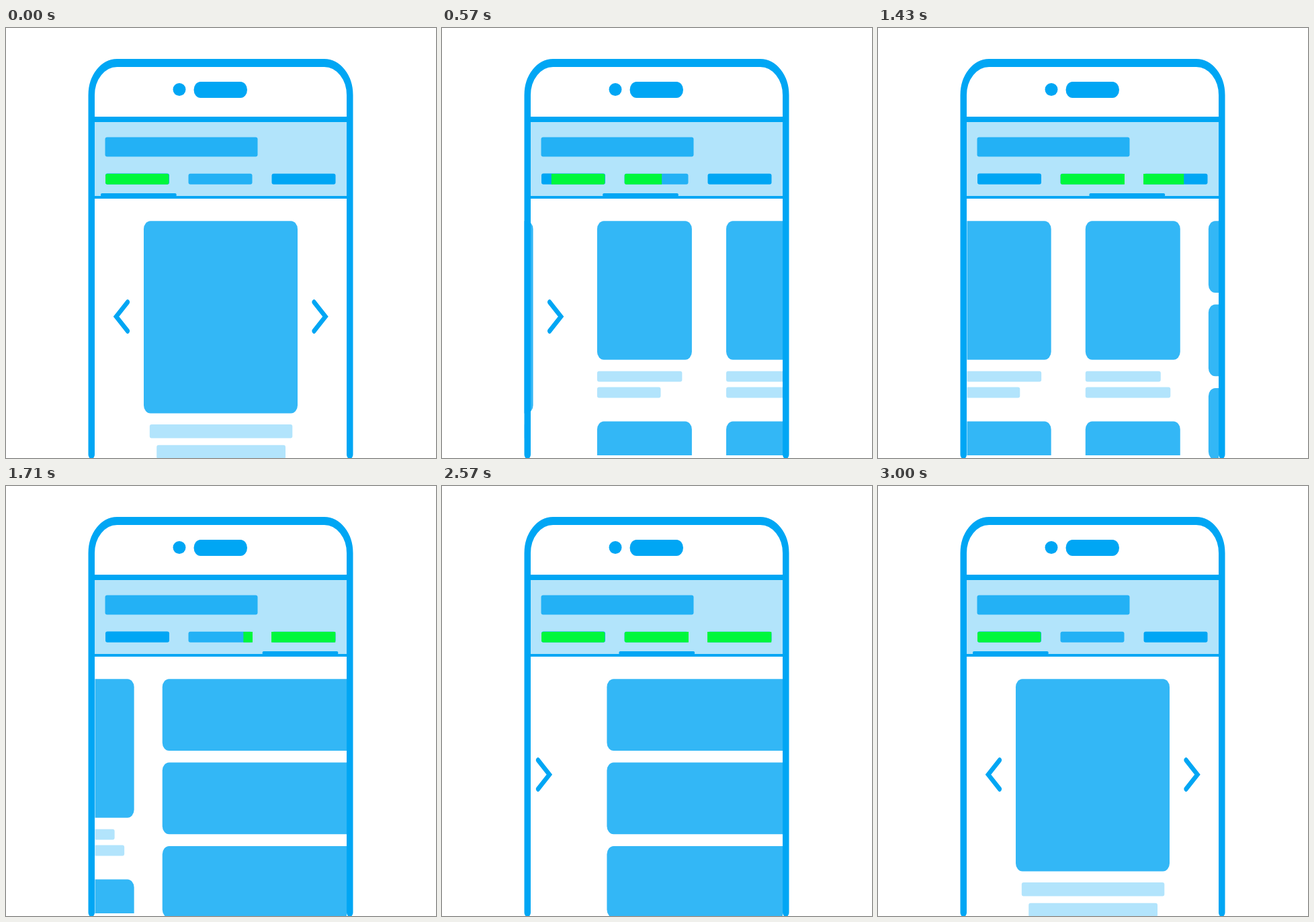
An HTML page with a canvas for the animation above (3070 ms loop, 640x640 px).

```html
<!DOCTYPE html>
<html lang="en">
<head>
<meta charset="utf-8">
<title>Phone tabs</title>
<style>
  html, body { margin: 0; width: 100%; height: 100%; overflow: hidden; background: #fff; }
  canvas { display: block; width: 640px; height: 640px; }
</style>
</head>
<body>
<canvas id="stage" width="640" height="640"></canvas>
<script>
const ctx = document.getElementById('stage').getContext('2d');
const LOOP = 3070;
const BLUE = '#00a6f4';
const MID = 'rgba(0,166,244,.8)';
const PALE = 'rgba(0,166,244,.3)';
const GREEN = '#00f73c';
const STRETCH = 1.26; // the artwork is taller than wide
const CARD_R = { x: 10, y: 12 };

// Hermite ease from time a to b with start and end slopes
function ease(k, a, b, s0 = 0, s1 = 0) {
  const u = Math.min(1, Math.max(0, (k - a) / (b - a)));
  if (u === 0 || u === 1) return u;
  return s0 * (u ** 3 - 2 * u * u + u) + 3 * u * u - 2 * u ** 3 + s1 * (u ** 3 - u * u);
}

// 14 steps per second, with one step in every 14 held twice
function stepAt(ms) {
  const n = Math.ceil((Math.floor(ms / 10) + 0.5) * 0.14) - 1;
  return n - Math.floor((n + 1) / 14);
}

function box(x1, y1, x2, y2, color, r = 3) {
  ctx.fillStyle = color;
  ctx.beginPath();
  ctx.roundRect(x1, y1, x2 - x1, y2 - y1, r);
  ctx.fill();
}

function card(x1, y1, x2, y2) {
  box(x1, y1, x2, y2, MID, CARD_R);
}

function strokeTall(width, draw) {
  ctx.save();
  ctx.scale(1, STRETCH);
  ctx.strokeStyle = BLUE;
  ctx.lineWidth = width;
  ctx.lineCap = 'round';
  ctx.beginPath();
  draw();
  ctx.stroke();
  ctx.restore();
}

function clipped(x1, x2, y2, dx, draw) {
  ctx.save();
  ctx.beginPath();
  ctx.rect(x1, 254, x2 - x1, y2 - 254);
  ctx.clip();
  ctx.translate(dx, 0);
  draw();
  ctx.restore();
}

function chevron(end, tip) {
  strokeTall(6, () => {
    ctx.moveTo(end, 408 / STRETCH);
    ctx.lineTo(tip, 429.5 / STRETCH);
    ctx.lineTo(end, 451 / STRETCH);
  });
}

function phone() {
  const top = 52 / STRETCH, bottom = 635 / STRETCH;
  const left = 127.25, right = 511.75, r = 38;
  strokeTall(9.5, () => {
    ctx.moveTo(left, bottom);
    ctx.arcTo(left, top, left + r, top, r);
    ctx.arcTo(right, top, right, top + r, r);
    ctx.lineTo(right, bottom);
  });
  box(248.5, 82, 267.5, 101, BLUE, 9.5);
  box(279.5, 80, 359, 104, BLUE, { x: 10, y: 12 });
}

function header() {
  box(132, 140, 507, 250, '#b2e4fb', 0);
  box(130, 132, 509, 140, BLUE, 0);
  box(130, 250, 509, 254, BLUE, 0);
  box(147.5, 162.5, 374.5, 191.5, MID);
}

// green part of a tab between fractions a and b
function fillTab(x1, x2, a, b, r) {
  if (b <= a) return;
  const w = x2 - x1;
  ctx.save();
  ctx.beginPath();
  ctx.rect(x1 + w * a, 210, w * (b - a), 30);
  ctx.clip();
  box(x1, 217, x2, 232.7, GREEN, r);
  ctx.restore();
}

function tabs(k) {
  box(148, 216.5, 243, 232.8, BLUE);
  box(271.5, 216.8, 366.5, 232.8, MID);
  box(395.5, 216.8, 490.5, 232.8, BLUE);

  // forward: fill and empty left to right; back: right to left
  if (k < 31) {
    fillTab(148, 242.6, ease(k, 7, 11), 1, 3);
    fillTab(271.5, 367, ease(k, 19.8, 24), ease(k, 3, 12), [3, 0, 0, 3]);
    fillTab(395, 490.5, 0, ease(k, 15, 21.8), 0);
  } else {
    fillTab(148, 242.6, 1 - ease(k, 32, 34), 1, 3);
    fillTab(271.5, 367, 1 - ease(k, 31, 33), 1 - ease(k, 35, 38), [3, 0, 0, 3]);
    fillTab(395, 490.5, 0, 1 - ease(k, 34, 37), 0);
  }

  const pos = ease(k, 3, 10) + ease(k, 15, 24) - 2 * ease(k, 31, 37);
  const x = 141 + 122.4 * pos;
  box(x, 246, x + 112.7, 251, BLUE, 2);
}

function slidePage() {
  card(205, 287.3, 434, 573.5);
  box(213.8, 590, 426.3, 610.5, PALE);
  box(224.2, 620.8, 416, 641.3, PALE);
  chevron(181, 164);
  chevron(458.5, 475.5);
}

function gridPage() {
  const column = (x, w1, w2) => {
    card(x, 287.3, x + 141, 493.7);
    box(x, 510.7, x + w1, 526.5, PALE);
    box(x, 534.5, x + w2, 550.4, PALE);
    card(x, 585.6, x + 141, 792);
  };
  column(154.3, 126.5, 94.6);
  column(346.4, 112, 126.5);
}

function listPage() {
  for (let i = 0; i < 3; i++) {
    const y = 287.3 + 124.3 * i;
    card(148, y, 491, y + 106.7);
  }
}

function draw(k) {
  ctx.fillStyle = '#fff';
  ctx.fillRect(0, 0, 640, 640);
  header();
  tabs(k);
  phone();

  const toGrid = ease(k, 3, 12, 2.095, 0.125);
  const toList = ease(k, 18.58, 27, 2.03);
  const back = ease(k, 33.28, 39, 2);
  const slideX = k < 31 ? -375 * toGrid : -413 * (1 - back);
  const gridX = 375 * (1 - toGrid) - 381.5 * toList;
  const listX = 381.5 * (1 - toList) + 413 * back;

  clipped(122.5, 507, 640, slideX, slidePage);
  clipped(132.5, 507, 636, gridX, gridPage);
  clipped(132.5, 507, 640, listX, listPage);
}

function tick() {
  draw(stepAt(performance.now() % LOOP));
  requestAnimationFrame(tick);
}
tick();
</script>
</body>
</html>
```
